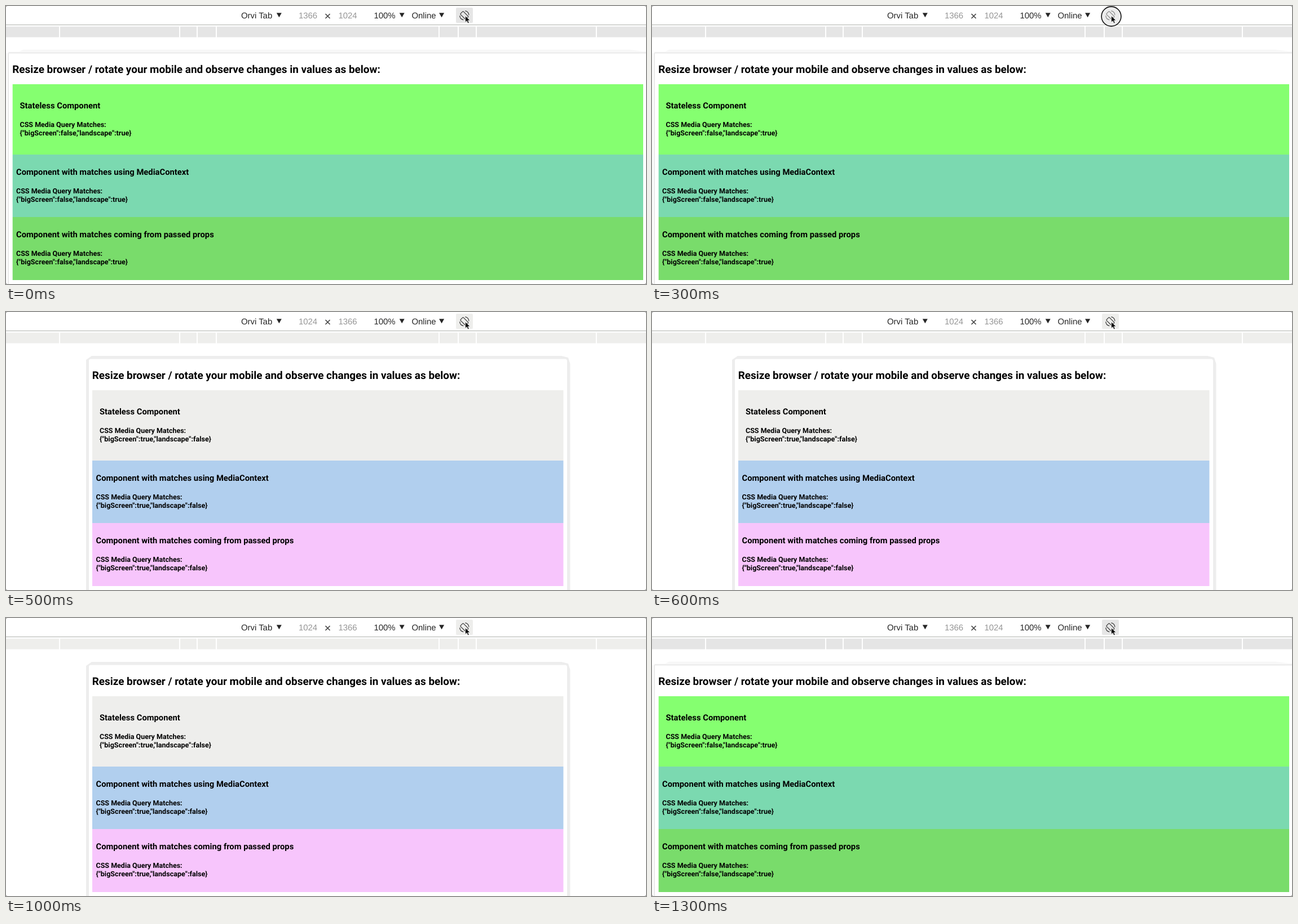
An HTML page that plays this animation: 1135 px wide and 494 px high, repeating every 1.4 s.

```html
<!DOCTYPE html>
<html lang="en">
<head>
<meta charset="utf-8">
<title>Media query demo</title>
<style>
  html, body { margin: 0; width: 100%; height: 100%; overflow: hidden; background: #fff; }
  svg { display: block; width: 1135px; height: 494px; text-rendering: geometricPrecision; }
  text { white-space: pre; }
  #page text { font-family: Roboto, "Liberation Sans", sans-serif; font-weight: bold; fill: #000; }
  #bar text { font-family: "Liberation Sans", Arial, sans-serif; font-size: 14.9px; fill: #262626; }
  #bar .dim { fill: #969696; }
</style>
</head>
<body>
<svg id="stage" viewBox="0 0 1135 494" xmlns="http://www.w3.org/2000/svg">
  <rect width="1135" height="494" fill="#fff"/>
  <g id="ruler"></g>
  <g id="bar">
    <path d="M0 33.5H1135" stroke="#aeb2ac"/>
    <text x="417" y="21.5">Orvi Tab</text>
    <text id="wide" class="dim" x="519" y="21.5"></text>
    <path d="M566.5 14l8 8m0-8l-8 8" stroke="#444" stroke-width="1.7"/>
    <text id="high" class="dim" x="589.5" y="21.5"></text>
    <text x="652.5" y="21.5">100%</text>
    <text x="719.5" y="21.5">Online</text>
    <g id="arrows" fill="#262626"></g>
    <rect id="button" x="798" y="3" width="30" height="27" rx="2"/>
    <circle id="ring" cx="814.5" cy="18.5" r="17.4" fill="#ececec" stroke="#111" stroke-width="1.6"/>
    <g id="icon" fill="none" stroke-width="1.15" transform="translate(812.8 16.6)">
      <rect x="-3.6" y="-6.8" width="7.2" height="13.6" rx="1" transform="rotate(-45)"/>
      <path d="M1.5 -8A8.2 8.2 0 0 1 8.1 -.5M-1.5 8A8.2 8.2 0 0 1 -8.1 .5"/>
    </g>
    <path d="M814.6 17.6v11.2l2.7-2.4 1.9 4.3 2-.9-1.9-4.1h3.6z" fill="#000" stroke="#fff" stroke-width=".7"/>
  </g>
  <g id="wideFrame">
    <path d="M30 77.5H1105L1128 80.5H1135V83H4V81H24z" fill="#f7f7f7"/>
    <rect y="84" width="4" height="410" fill="#fafafa"/>
    <path d="M4.5 494V83.5H1135" fill="none" stroke="#dedede"/>
  </g>
  <g id="tallFrame">
    <path d="M142 494V85L152 78H985L997 81L1000.5 92V494z" fill="#ededed"/>
    <path d="M147 494V87Q147 83.5 150.5 83.5H991.5Q995 83.5 995 87V494z" fill="#fff"/>
  </g>
  <g id="panels"></g>
  <g id="page"></g>
  <path d="M0 0H3Q0 0 0 3zM1135 0h-3q3 0 3 3zM0 494v-3q0 3 3 3zM1135 494v-3q0 3-3 3z" fill="#999"/>
</svg>
<script>
const LOOP = 1400, ROTATE = 400, BACK = 1300;
const $ = id => document.getElementById(id);

function add(parent, tag, attrs, text = "") {
  const el = document.createElementNS("http://www.w3.org/2000/svg", tag);
  for (const key in attrs) el.setAttribute(key, attrs[key]);
  el.textContent = text;
  parent.append(el);
  return el;
}

const write = (x, y, size, text) => add($("page"), "text", { x, y, "font-size": size }, text);

// Ruler segments sit between the white gaps
const gaps = [95, 308, 339, 373, 768, 802, 834, 1047, 1136];
gaps.forEach((gap, i) => {
  const x = i ? gaps[i - 1] + 1 : 0;
  add($("ruler"), "rect", { x, y: 36.5, width: gap - 1 - x, height: 19 });
});
for (const x of [484.3, 702.2, 772.6])
  add($("arrows"), "path", { d: `M${x - 4.5} 12.3h9l-4.5 8z` });

const sections = [
  { top: 139, end: 264, x: 24.5, base: 182.2, title: "Stateless Component", colors: ["#85ff70", "#eeeeec"] },
  { top: 264, end: 375, x: 18, base: 300, title: "Component with matches using MediaContext", colors: ["#7bd9b0", "#b1cfee"] },
  { top: 375, end: 487, x: 18, base: 411.2, title: "Component with matches coming from passed props", colors: ["#79dc6b", "#f7c5fc"] }
];

write(11.2, 118.6, 18.92, "Resize browser / rotate your mobile and observe changes in values as below:");
for (const s of sections) {
  s.panel = add($("panels"), "rect", { y: s.top, height: s.end - s.top });
  write(s.x, s.base, 14.77, s.title);
  write(s.x, s.base + 33.2, 12.5, "CSS Media Query Matches:");
  s.json = write(s.x, s.base + 48, 12.6, "");
}

const show = (id, on) => $(id).setAttribute("visibility", on ? "visible" : "hidden");

function draw(t) {
  const tall = t >= ROTATE && t < BACK;
  const ring = t >= 300 && t < ROTATE;
  const pressed = ring || (t >= 1200 && t < BACK);

  $("wide").textContent = tall ? 1024 : 1366;
  $("high").textContent = tall ? 1366 : 1024;
  $("ruler").setAttribute("fill", tall ? "#eeeeec" : "#e5e5e5");
  $("button").setAttribute("fill", tall ? "#eeeeec" : "#e6e6e6");
  $("icon").setAttribute("stroke", pressed ? "#858585" : "#333");
  show("button", !ring);
  show("ring", ring);
  show("wideFrame", !tall);
  show("tallFrame", tall);

  $("page").setAttribute("transform", `translate(${tall ? 141.5 : 0} 0)`);
  for (const s of sections) {
    s.panel.setAttribute("x", tall ? 153 : 11.7);
    s.panel.setAttribute("width", tall ? 835.5 : 1118.3);
    s.panel.setAttribute("fill", s.colors[+tall]);
    s.json.textContent = JSON.stringify({ bigScreen: tall, landscape: !tall });
  }
}

const start = performance.now();
function tick() {
  draw((performance.now() - start) % LOOP);
  requestAnimationFrame(tick);
}
tick();
</script>
</body>
</html>
```
